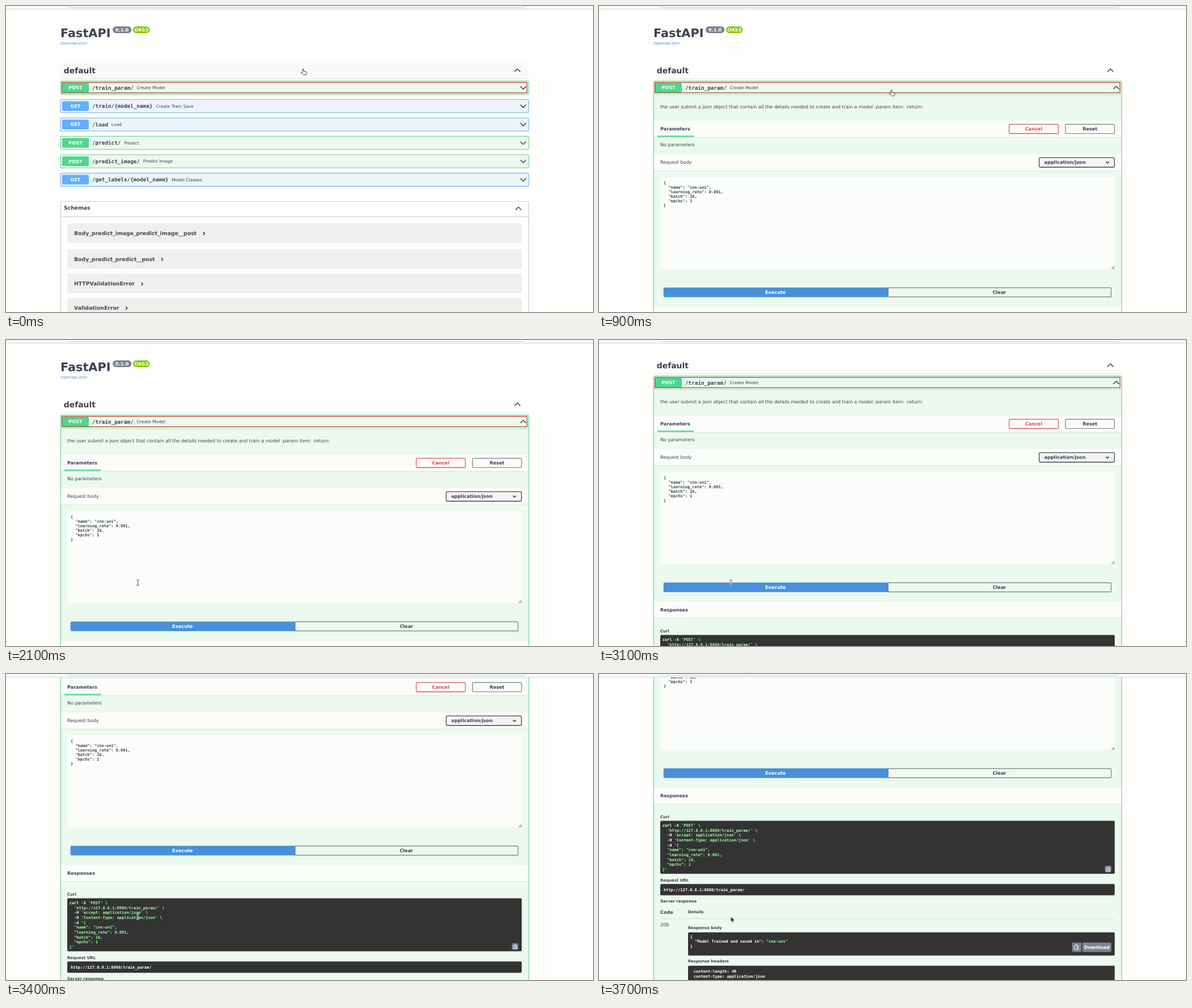
Write an HTML page that moves like this. It is 1035 px wide and 541 px high and loops after 5600 ms.

```html
<!DOCTYPE html>
<html lang="en">
<head>
<meta charset="utf-8">
<title>API docs</title>
<style>
html, body { margin: 0; width: 100%; height: 100%; overflow: hidden; background: #fefefc; }
svg { display: block; width: 100%; height: 100%; }
text {
  font: 8.13px "DejaVu Sans", sans-serif; fill: #3b4151;
  white-space: pre; text-rendering: geometricPrecision;
}
.b { font-weight: 700; }
.s { font-size: 6.97px; }
.l { font-size: 9.3px; }
.m { font: 700 6.97px "DejaVu Sans Mono", monospace; }
.path { font: 700 9.3px "DejaVu Sans Mono", monospace; }
.c { text-anchor: middle; }
.w, .dark text { fill: #fff; }
.dark .g { fill: #a2fca2; }
.dark rect { fill: #333; }
.dark rect.btn { fill: #7d8293; }
.bar { fill: #fafdf9; }
.rule { stroke: #3b4151; stroke-opacity: .2; stroke-width: .7; }
.chev { fill: none; stroke: #25282f; stroke-width: 1.3; }
.icon { fill: none; stroke: #fff; stroke-width: .9; }
.post { --main: #4fd68f; --tint: #ebf9ee; }
.get { --main: #61affe; --tint: #ecf5fd; }
.op { fill: var(--tint); stroke: var(--main); stroke-width: 1.1; stroke-opacity: .8; }
.glow { fill: none; stroke: #000; stroke-opacity: .07; stroke-width: 2.8; }
.badge { fill: var(--main); }

#page, #hover, #closed, #open, #pointer, #hand, #beam, #arrow { animation: 5600ms infinite step-end; }
#page { animation-name: scroll; }
#hover { animation-name: hover; }
#closed { animation-name: closed; }
#open { animation-name: open; }
#pointer { animation-name: move; }
#hand { animation-name: hand; }
#beam { animation-name: beam; }
#arrow { animation-name: arrow; }

@keyframes scroll {
  0% { transform: translateY(0); }
  55.357% { transform: translateY(-69px); }
  57.142% { transform: translateY(-137px); }
  58.928% { transform: translateY(-165px); }
  60.714% { transform: translateY(-194px); }
  62.5% { transform: translateY(-222px); }
  64.285% { transform: translateY(-277px); }
  66.071%, 100% { transform: translateY(-331px); }
}
@keyframes hover { 0% { opacity: 1; } 7.142%, 100% { opacity: 0; } }
@keyframes closed { 0% { opacity: 1; } 16.071%, 100% { opacity: 0; } }
@keyframes open { 0% { opacity: 0; } 16.071%, 100% { opacity: 1; } }
@keyframes move {
  0% { transform: translate(524px, 111px); }
  5.357% { transform: translate(524px, 111px); animation-timing-function: steps(4, start); }
  12.5% { transform: translate(515.5px, 148.5px); }
  28.571% { transform: translate(515.5px, 148.5px); animation-timing-function: steps(6, start); }
  39.285%, 100% { transform: translate(232.4px, 429px); }
}
@keyframes hand { 0% { opacity: 1; } 28.571%, 100% { opacity: 0; } }
@keyframes beam { 0% { opacity: 0; } 33.928% { opacity: 1; } 66.071%, 100% { opacity: 0; } }
@keyframes arrow {
  0% { opacity: 0; } 28.571% { opacity: 1; } 33.928% { opacity: 0; } 66.071%, 100% { opacity: 1; }
}
</style>
</head>
<body>
<svg viewBox="0 0 1035 541" preserveAspectRatio="none">
  <rect width="1035" height="541" fill="#fefefc"/>

  <g id="page">
    <text class="b" x="96" y="54.6" style="font-size:20.8px">FastAPI</text>
    <rect x="188" y="36" width="33.3" height="12" rx="6" fill="#7d8492"/>
    <text class="b c w" x="204.6" y="45">0.1.0</text>
    <rect x="224" y="36" width="29.6" height="12" rx="6" fill="#8acb04"/>
    <text class="b c w" x="238.8" y="45">OAS3</text>
    <text class="s" x="96" y="68.4" style="fill:#4990d6">/openapi.json</text>

    <rect id="hover" x="96" y="100" width="825.5" height="28.5" fill="#f9f9f7"/>
    <text class="b" x="101.8" y="119" style="font-size:13.9px">default</text>
    <path class="chev" d="M896.5 116.3l5.2-5.2 5.2 5.2"/>
    <path class="rule" d="M96 128.7H921.5"/>

    <g id="closed">
      <g id="rows"></g>
      <path d="M96.5 541V348q0-2.3 2.3-2.3H919.2q2.3 0 2.3 2.3V541M96.5 372.5H921.5" fill="none" stroke="#c3c5c9" stroke-width=".9"/>
      <text class="b l" x="102" y="360.4">Schemas</text>
      <path class="chev" d="M898.3 360.6l5.2-5.2 5.2 5.2"/>
      <g id="schemas"></g>
    </g>

    <g id="open" class="post">
      <rect class="glow" x="96.5" y="132.9" width="825" height="900" rx="2.3"/>
      <rect class="op" x="96.5" y="132.9" width="825" height="900" rx="2.3"/>
      <path d="M97 156.5H921" stroke="#49cc90" stroke-opacity=".6" stroke-width=".8"/>
      <g id="head"></g>
      <text x="108" y="180.8">the user submit a json object that contain all the details needed to create and train a model :param item: :return:</text>

      <g id="bars"></g>
      <text class="b" x="108" y="219.9">Parameters</text>
      <rect class="badge" x="103" y="229.2" width="64" height="2.3"/>
      <rect x="723.3" y="209.2" width="86.6" height="16.3" rx="1.5" fill="none" stroke="#e2535a" stroke-width="1.3"/>
      <text class="b c" x="766.5" y="219.9" style="fill:#d9454f">Cancel</text>
      <rect x="822.5" y="209.2" width="86.4" height="16.3" rx="1.5" fill="none" stroke="#777b82" stroke-width="1.2"/>
      <text class="b c" x="865.7" y="219.9">Reset</text>
      <text x="108" y="248">No parameters</text>

      <text x="108" y="279">Request body</text>
      <rect x="776.2" y="268.2" width="132.6" height="16.8" rx="2.3" fill="#f5f4f5" stroke="#41444e" stroke-width="1.3"/>
      <text class="b" x="785" y="278.9">application/json</text>
      <path class="chev" d="M893.8 275.3l2.7 2.7 2.7-2.7"/>

      <rect class="bar" x="108" y="303" width="801.3" height="162.3" rx="1.5"/>
      <path d="M902.5 465l6.3-6.3V465z" fill="#b3b9b4"/>
      <g id="body"></g>

      <path d="M510 497.7H116q-2.3 0-2.3 2.3v12.5q0 2.3 2.3 2.3H510z" fill="#4990dc"/>
      <text class="b c w" x="311.2" y="509">Execute</text>
      <path d="M509.8 498.2H901q2 0 2 2v12.2q0 2-2 2H509.8z" fill="none" stroke="#777b82" stroke-width="1.2"/>
      <text class="b c" x="706" y="509">Clear</text>

      <text class="b" x="108" y="549">Responses</text>
      <text class="b s" x="108" y="585.6">Curl</text>
      <g class="dark">
        <rect x="108" y="590.6" width="801.3" height="93.6" rx="2.3"/>
        <g id="curl"></g>
        <rect class="btn" x="892" y="670" width="11.4" height="11.6" rx="2"/>
        <path class="icon" d="M895 674.2h5.5v5.6H895zM896.5 673h2.4M901.2 677h-3.6M899 675.6l-1.6 1.4 1.6 1.4"/>
      </g>
      <text class="b s" x="108" y="697.6">Request URL</text>
      <g class="dark">
        <rect x="108" y="702.2" width="801.3" height="20" rx="2.3"/>
        <text class="m" x="114" y="714.8">http://127.0.0.1:8000/train_param/</text>
      </g>
      <text class="b s" x="108" y="735.4">Server response</text>
      <text class="b" x="108" y="754.6">Code</text>
      <text class="b s" x="157" y="754.2">Details</text>
      <path class="rule" d="M108 763.8H909.3"/>
      <text x="108" y="777.4">200</text>
      <text class="b s" x="157" y="782.4">Response body</text>
      <g class="dark">
        <rect x="157" y="787.7" width="752.3" height="41" rx="2.3"/>
        <g id="reply"></g>
        <rect class="btn" x="834" y="805.8" width="16.6" height="16.6" rx="2.3"/>
        <path class="icon" d="M838.5 811h6.5v7.2h-6.5zM840.4 809.8h2.8M846 815h-4M843.6 813.3l-1.8 1.7 1.8 1.7"/>
        <rect class="btn" x="852.2" y="805.8" width="51.2" height="16.6" rx="2.3"/>
        <text class="b c" x="877.8" y="816.7">Download</text>
      </g>
      <text class="b s" x="157" y="841.4">Response headers</text>
      <g class="dark">
        <rect x="157" y="846.7" width="752.3" height="60" rx="2.3"/>
        <g id="headers"></g>
      </g>
    </g>
  </g>

  <rect width="1035" height="5.6" fill="#f9f9fa"/>
  <path d="M0 5.6H1035" stroke="#d2d2d4" stroke-width=".9"/>
  <rect x="109.3" y="-15" width="806" height="17.6" rx="2.3" fill="#fff" stroke="#c6c6ca" stroke-width=".9"/>

  <g id="pointer">
    <path id="hand" d="M-1 .8Q0-.4 1 .8V4.5L5 5.2Q6.2 5.6 6 7L5.2 10.5H0L-3.6 6.8Q-3.6 5.6-2.4 6L-1 7Z" fill="#fff" stroke="#333" stroke-width=".9"/>
    <g id="beam" fill="none">
      <path d="M-2.2-4.6H2.2M0-4.6V4.6M-2.2 4.6H2.2" stroke="#fff" stroke-width="2.4"/>
      <path d="M-2.2-4.6H2.2M0-4.6V4.6M-2.2 4.6H2.2" stroke="#333" stroke-width=".9"/>
    </g>
    <path id="arrow" d="M0 0V9.5L2.2 7.5 3.8 10.8 5.2 10.1 3.7 7H6.8Z" fill="#222" stroke="#fff" stroke-width=".6"/>
  </g>
</svg>

<script>
const put = (id, html) => { document.getElementById(id).innerHTML = html; };

// Summary line of an operation, centred on y.
function summary(y, method, path, label, open) {
  const tip = open ? `M907 ${y + 2.4}l5-5 5 5` : `M907 ${y - 2.4}l5 5 5-5`;
  return `<rect class="badge" x="99" y="${y - 8.5}" width="47" height="17" rx="1.8"/>
    <text class="b c w" x="122.5" y="${y + 3}">${method}</text>
    <text class="path" x="152" y="${y + 3.2}">${path}</text>
    <text x="${157.8 + path.length * 5.6}" y="${y + 2.8}" style="font-size:7.55px">${label}</text>
    <path class="chev" d="${tip}"/>`;
}

const focus = `<rect x="98.6" y="135.2" width="820" height="18.2" fill="none" stroke="#b5482a" stroke-width="1.3"/>`;

const row = ([method, path, label], i) => {
  const y = 144.4 + i * 32.54;
  const box = `x="96.5" y="${y - 11.5}" width="825" height="23" rx="2.3"`;
  return `<g class="${method.toLowerCase()}"><rect class="glow" ${box}/><rect class="op" ${box}/>
    ${summary(y, method, path, label)}</g>`;
};

// Guillemets mark highlighted strings.
const code = (x, y, step, lines) => lines.map((line, i) =>
  `<text class="m" x="${x}" y="${y + i * step}">${
    line.replace(/«/g, '<tspan class="g">').replace(/»/g, '</tspan>')}</text>`).join('');

const schema = ([name, y, tip]) =>
  `<rect x="108" y="${y - 17.2}" width="801.3" height="34.4" rx="2.3" fill="#f0efee"/>
   <text class="b l" x="120" y="${y + 3.4}" style="fill:#484848">${name}</text>
   <path class="chev" d="M${tip - 1.5} ${y - 2}l2.8 2.8-2.8 2.8"/>`;

const bar = ([y, h]) =>
  `<rect class="bar" x="97" y="${y}" width="824" height="${h}"/>
   <path d="M97 ${y + h + .4}H921" stroke="#000" stroke-opacity=".09"/>`;

put('rows', [
  ['POST', '/train_param/', 'Create Model'],
  ['GET', '/train/{model_name}', 'Create Train Save'],
  ['GET', '/load', 'Load'],
  ['POST', '/predict/', 'Predict'],
  ['POST', '/predict_image/', 'Predict Image'],
  ['GET', '/get_labels/{model_name}', 'Model Classes']
].map(row).join('') + focus);

put('schemas', [
  ['Body_predict_image_predict_image__post', 401.4, 349],
  ['Body_predict_predict__post', 447.3, 275.3],
  ['HTTPValidationError', 490.4, 240],
  ['ValidationError', 533.4, 212.5]
].map(schema).join(''));

put('head', summary(144.4, 'POST', '/train_param/', 'Create Model', true) + focus);
put('bars', [[202.8, 29], [262, 29], [532, 28.6]].map(bar).join(''));

const params = ['  "name": "cnn-uni",', '  "learning_rate": 0.001,', '  "batch": 16,', '  "epchs": 1'];
put('body', code(114, 315, 7.97, ['{', ...params, '}']));
put('curl', code(111.7, 601, 8.68, [
  "curl -X «'POST'» \\",
  "  «'http://127.0.0.1:8000/train_param/'» \\",
  "  -H «'accept: application/json'» \\",
  "  -H «'Content-Type: application/json'» \\",
  "  -d «'{»",
  ...params.map(p => `«${p}»`),
  "«}'»"
]));
put('reply', code(160.7, 797.8, 8.68, ['{', '  "Model Trained and saved in": «"cnn-uni"»', '}']));
put('headers', code(166.8, 859.4, 8.68, [
  'content-length: 40', 'content-type: application/json', 'date: Sun,04 Apr 2021 19:43:19 GMT'
]));
</script>
</body>
</html>
```
